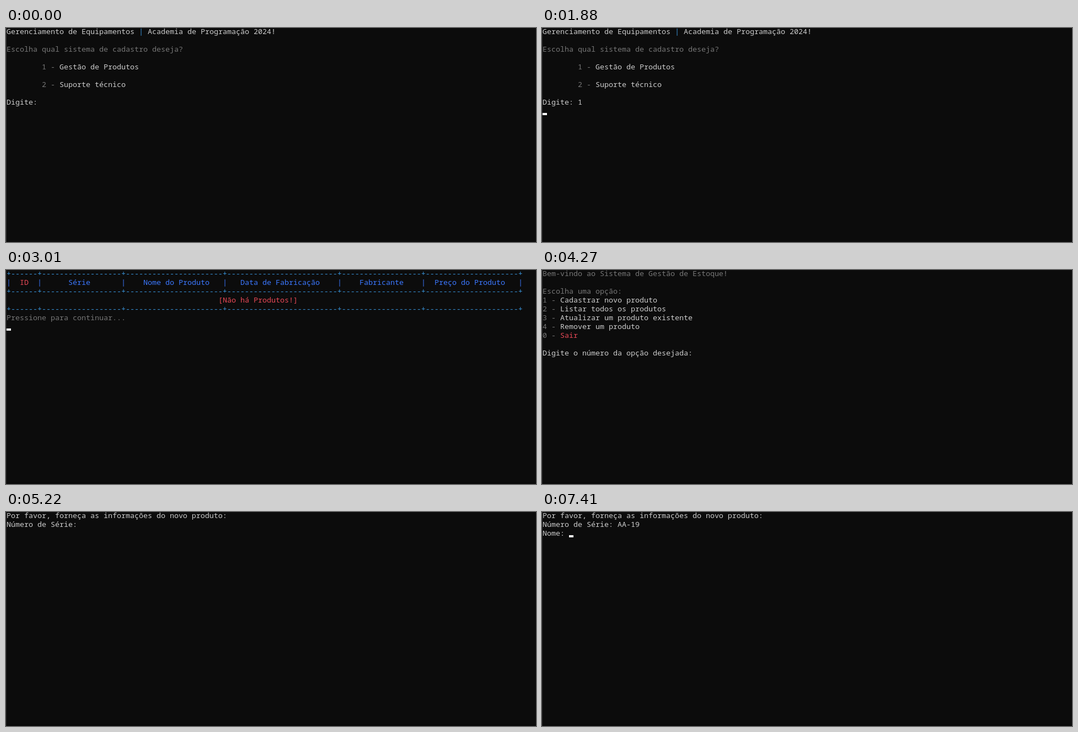
Write an HTML page that moves like this. It is 961 px wide and 388 px high and loops after 8000 ms.

```html
<!DOCTYPE html>
<html lang="pt-BR">
<head>
<meta charset="utf-8">
<title>Console</title>
<style>
html, body { margin: 0; width: 100%; height: 100%; overflow: hidden; background: #0c0c0c; }
#stage { position: absolute; left: 0; top: 0; width: 961px; height: 388px; overflow: hidden; background: #0c0c0c; }
#stage span {
  position: absolute; height: 16px; white-space: pre;
  font: 13.3333px/16px "Noto Sans Mono", "DejaVu Sans Mono", monospace;
  font-kerning: none; font-variant-ligatures: none;
}
#edge { position: absolute; left: 0; top: 0; width: 1px; height: 388px; }
#base { position: absolute; left: 0; top: 384px; width: 961px; height: 4px; background: #0a0a0a; }
#cursor { position: absolute; width: 8px; height: 4px; background: #fff; }
</style>
</head>
<body>
<div id="stage">
  <div id="base"></div>
  <div id="edge"></div>
  <div id="text"></div>
  <div id="cursor"></div>
</div>
<script>
const LOOP = 8000, CELL_W = 8, CELL_H = 16;
const LIGHT = "#cccccc", GRAY = "#767676", RED = "#e74856", BLUE = "#3b78ff", CYAN = "#3a96dd";
const $ = id => document.getElementById(id);

// A run of text is [row, column, colour, string].
const option = (row, col, key, label, color = LIGHT) =>
  [[row, col, GRAY, key + " -"], [row, col + 4, color, label]];

const home = typed => [
  [0, 0, LIGHT, "Gerenciamento de Equipamentos"],
  [0, 30, CYAN, "|"],
  [0, 32, LIGHT, "Academia de Programação 2024!"],
  [2, 0, GRAY, "Escolha qual sistema de cadastro deseja?"],
  ...option(4, 8, 1, "Gestão de Produtos"),
  ...option(6, 8, 2, "Suporte técnico"),
  [8, 0, LIGHT, "Digite: " + typed]
];

const menu = (typed, head) => [
  [0, 0, head, "Bem-vindo ao Sistema de Gestão de Estoque!"],
  [2, 0, head, "Escolha uma opção:"],
  ...option(3, 0, 1, "Cadastrar novo produto"),
  ...option(4, 0, 2, "Listar todos os produtos"),
  ...option(5, 0, 3, "Atualizar um produto existente"),
  ...option(6, 0, 4, "Remover um produto"),
  ...option(7, 0, 0, "Sair", RED),
  [9, 0, LIGHT, "Digite o número da opção desejada: " + typed]
];

const table = () => {
  const bars = [0, 7, 26, 49, 75, 94, 116];
  const rule = bars.slice(1).reduce((s, b, i) => s + "-".repeat(b - bars[i] - 1) + "+", "+");
  return [
    ...[0, 2, 4].map(row => [row, 0, CYAN, rule]),
    ...bars.map(col => [1, col, BLUE, "|"]),
    [1, 3, RED, "ID"],
    [1, 14, BLUE, "Série"],
    [1, 31, BLUE, "Nome do Produto"],
    [1, 53, BLUE, "Data de Fabricação"],
    [1, 80, BLUE, "Fabricante"],
    [1, 97, BLUE, "Preço do Produto"],
    [3, 48, RED, "[Não há Produtos!]"],
    [5, 0, GRAY, "Pressione para continuar..."]
  ];
};

const form = (serial, name = "") => [
  [0, 0, LIGHT, "Por favor, forneça as informações do novo produto:"],
  [1, 0, LIGHT, "Número de Série: " + serial],
  [2, 0, LIGHT, name]
];

// Each step: start time, screen, cursor [row, column] when visible.
const steps = [
  [0, home("")],
  [1030, home(""), [8, 8]],
  [1420, home("1"), [8, 9]],
  [1550, home("1")],
  [1880, home("1"), [9, 0]],
  [1950, menu("", LIGHT), [9, 35]],
  [2610, menu("", LIGHT)],
  [2740, menu("2", LIGHT), [9, 36]],
  [2940, menu("2", LIGHT), [10, 0]],
  [3010, table(), [6, 0]],
  [3670, table()],
  [4200, table(), [6, 0]],
  [4270, menu("", GRAY)],
  [4340, menu("", GRAY), [9, 35]],
  [4890, menu("1", GRAY), [9, 36]],
  [5150, menu("1", GRAY), [10, 0]],
  [5220, form("")],
  [6280, form("A"), [1, 18]],
  [6410, form("AA"), [1, 19]],
  [6740, form("AA")],
  [6810, form("AA-"), [1, 20]],
  [6940, form("AA-1"), [1, 21]],
  [7140, form("AA-19"), [1, 22]],
  [7340, form("AA-19"), [2, 0]],
  [7410, form("AA-19", "Nome: "), [2, 6]]
];

const left = col => 1 + col * CELL_W + "px";

function show([, runs, cursor]) {
  $("text").replaceChildren(...runs.map(([row, col, color, str]) => {
    const span = document.createElement("span");
    span.textContent = str;
    span.style.left = left(col);
    span.style.top = row * CELL_H - 2 + "px";
    span.style.color = color;
    return span;
  }));
  const style = $("cursor").style;
  style.display = cursor ? "block" : "none";
  if (cursor) {
    style.left = left(cursor[1]);
    style.top = cursor[0] * CELL_H + 10 + "px";
  }
}

let current;
const start = performance.now();

function draw() {
  const t = Math.max(0, performance.now() - start) % LOOP;
  const step = steps.findLast(s => s[0] <= t);
  if (step !== current) show(current = step);
  $("edge").style.background = t < 500 ? "#303030" : "#1e1e1e";
  requestAnimationFrame(draw);
}
draw();
</script>
</body>
</html>
```
